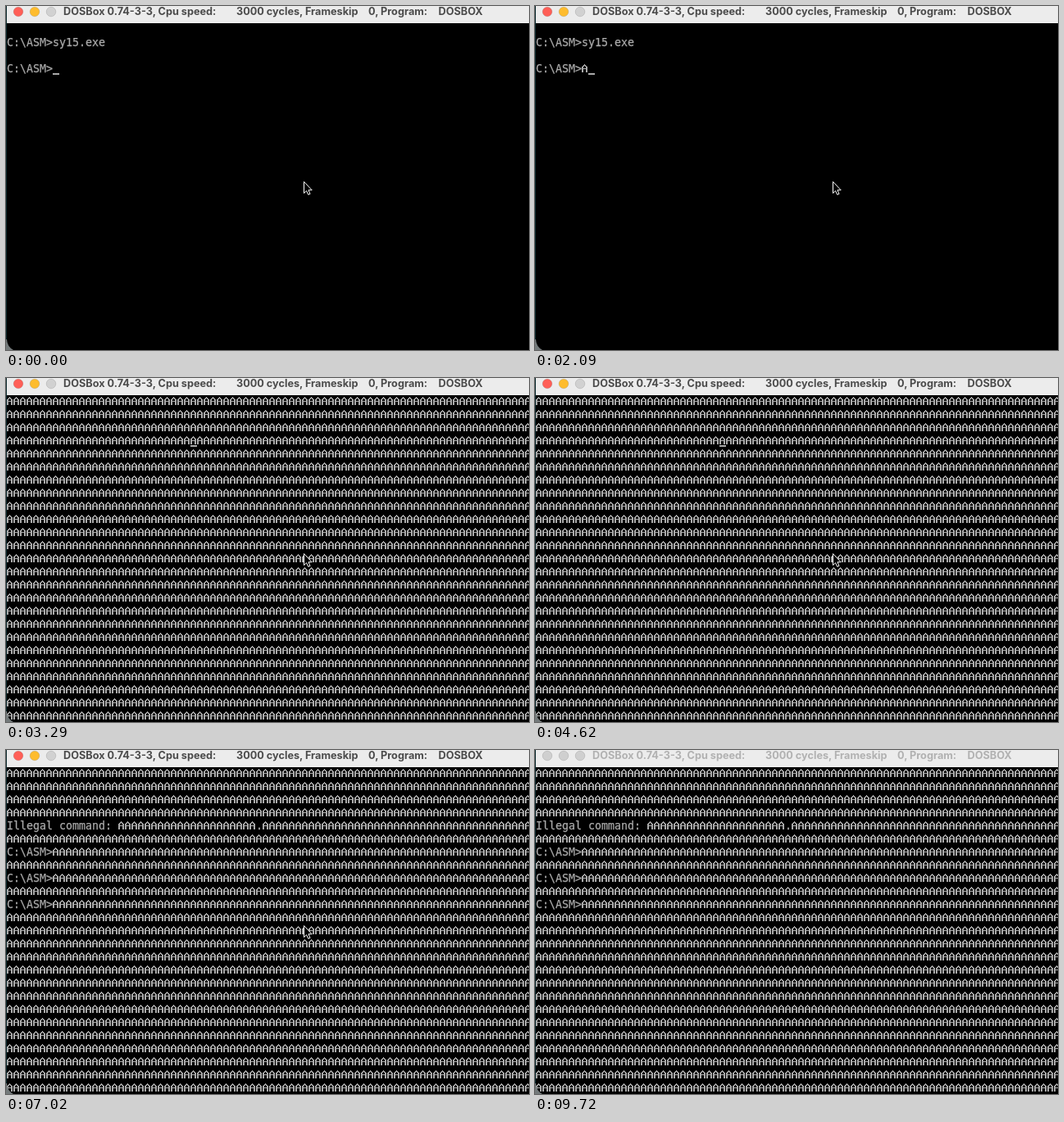
Write an HTML page that moves like this. It is 638 by 420 pixels and loops after 9820 ms.

```html
<!DOCTYPE html>
<html lang="en">
<head>
<meta charset="utf-8">
<title>DOSBox</title>
<style>
  html, body { margin: 0; width: 100%; height: 100%; overflow: hidden; background: #000; }
  svg { display: block; }
  .mono { font: 13.29px "DejaVu Sans Mono", monospace; fill: #aaa; stroke: #aaa; stroke-width: .25px; }
  .title { font: 700 12.7px Inter, sans-serif; fill: #4b4b4b; }
  .lights circle { stroke: #000; stroke-opacity: .12; }
  .idle .title { fill: #b1b1b1; }
  .idle .lights circle { fill: #cfcfcf; }
</style>
</head>
<body>
<svg id="stage" width="638" height="420" viewBox="0 0 638 420">
  <defs>
    <pattern id="fill" x="1" y="21" width="8" height="16" patternUnits="userSpaceOnUse">
      <path d="M0 12V5h1V4h1V3h1V2h1v1h1v1h1v1h1v7h-2V8H2v4zM2 7h3V5H4V4H3v1H2z"
            fill="#aaa" fill-rule="evenodd" shape-rendering="crispEdges"/>
    </pattern>
  </defs>
  <rect width="638" height="420"/>
  <g id="screen"></g>
  <rect id="caret" width="8" height="2" fill="#aaa"/>
  <rect width="638" height="21" fill="#ececec"/>
  <rect width="1" height="420" fill="#0c2a2e"/>
  <path d="M0 407H1Q1.5 416 9 420H0z" fill="#747a7b"/>
  <g class="lights">
    <circle cx="15" cy="7" r="5.8" fill="#ff5f57"/>
    <circle cx="35" cy="7" r="5.8" fill="#febc2e"/>
    <circle cx="55" cy="7" r="5.8" fill="#d1d1d1"/>
  </g>
  <g class="title">
    <text x="70" y="11">DOSBox 0.74-3-3, Cpu speed:</text>
    <text x="281" y="11">3000 cycles, Frameskip</text>
    <text x="442" y="11">0, Program:</text>
    <text x="527.5" y="11">DOSBOX</text>
  </g>
  <path id="mouse" d="M.5 .5V14.6L3.6 11.7 5.8 16.4 8 15.4 5.9 10.8H10.2z" fill="#000" stroke="#fff"/>
</svg>
<script>
const LOOP = 9820, FULL = 3290;
const stage = document.getElementById("stage");
const screen = document.getElementById("screen");
const caret = document.getElementById("caret");
const mouse = document.getElementById("mouse");

const colX = c => 1 + c * 8;
const rowY = r => 21 + r * 16;

function add(parent, tag, attrs) {
  const el = document.createElementNS("http://www.w3.org/2000/svg", tag);
  for (const k in attrs) el.setAttribute(k, attrs[k]);
  parent.appendChild(el);
  return el;
}

function cells(parent, row, col, count, paint) {
  return add(parent, "rect", {
    x: colX(col), y: rowY(row), width: count * 8, height: 16, fill: paint
  });
}

function print(parent, row, col, str) {
  cells(parent, row, col, str.length, "#000");
  add(parent, "text", { class: "mono", x: colX(col), y: rowY(row) + 12 }).textContent = str;
}

// Groups shown between two times
const layers = [];
function layer(from, to) {
  const g = add(screen, "g", {});
  layers.push({ g, from, to });
  return g;
}

const PROMPT = "C:\\ASM>";
const start = layer(0, FULL);
print(start, 1, 0, PROMPT + "sy15.exe");
print(start, 3, 0, PROMPT);
const typed = cells(start, 3, 7, 0, "url(#fill)");

add(layer(FULL, LOOP), "rect", { x: 1, y: 21, width: 640, height: 400, fill: "url(#fill)" });

const error = layer(5070, LOOP);
print(error, 4, 0, "Illegal command:");
cells(error, 4, 16, 1, "#000");
print(error, 4, 38, ".");
print(error, 6, 0, PROMPT);
print(layer(5970, LOOP), 8, 0, PROMPT);
print(layer(6420, LOOP), 10, 0, PROMPT);

// Caret starts lit and toggles at each time
const blinks = [
  150, 300, 600, 750, 890, 1190, 1340, 1640, 1790, 2090, 2240, 2540, 2690, 2990,
  3140, 3290, 3590, 3740, 4030, 4180, 4470, 4620, 4920, 5070, 5370, 5520, 5670,
  5970, 6120, 6420, 6570, 6870, 7020, 7320, 7470, 7770, 7920, 8220, 8520, 8820,
  8970, 9270, 9420
];

function typedCount(t) {
  if (t < 2090) return 0;
  if (t < 2540) return 1;
  if (t >= FULL) return 21;
  return Math.round(2 + Math.floor((t - 2540) / 150) * 4.5);
}

function caretRow(t) {
  return t < 5070 ? 3 : t < 5970 ? 6 : t < 6420 ? 8 : 10;
}

function mousePart(t) {
  if (t < 7920) return 0;
  const p = Math.min(1, (Math.floor((t - 7920) / 150) + 1) / 3);
  return p * p * (3 - 2 * p);
}

function render(t) {
  for (const { g, from, to } of layers)
    g.style.display = t >= from && t < to ? "" : "none";

  const count = typedCount(t), row = caretRow(t);
  typed.setAttribute("width", count * 8);
  caret.setAttribute("x", colX(7 + (row === 3 ? count : 0)));
  caret.setAttribute("y", rowY(row) + 13);
  caret.style.display = blinks.filter(b => b <= t).length % 2 ? "none" : "";

  const p = mousePart(t);
  mouse.setAttribute("transform", `translate(${363 + 190 * p} ${214 + 202 * p})`);
  mouse.style.display = t < 8370 ? "" : "none";
  stage.classList.toggle("idle", t >= 9720);
}

const begin = performance.now();
function tick() {
  render((performance.now() - begin) % LOOP);
  requestAnimationFrame(tick);
}
tick();
</script>
</body>
</html>
```
